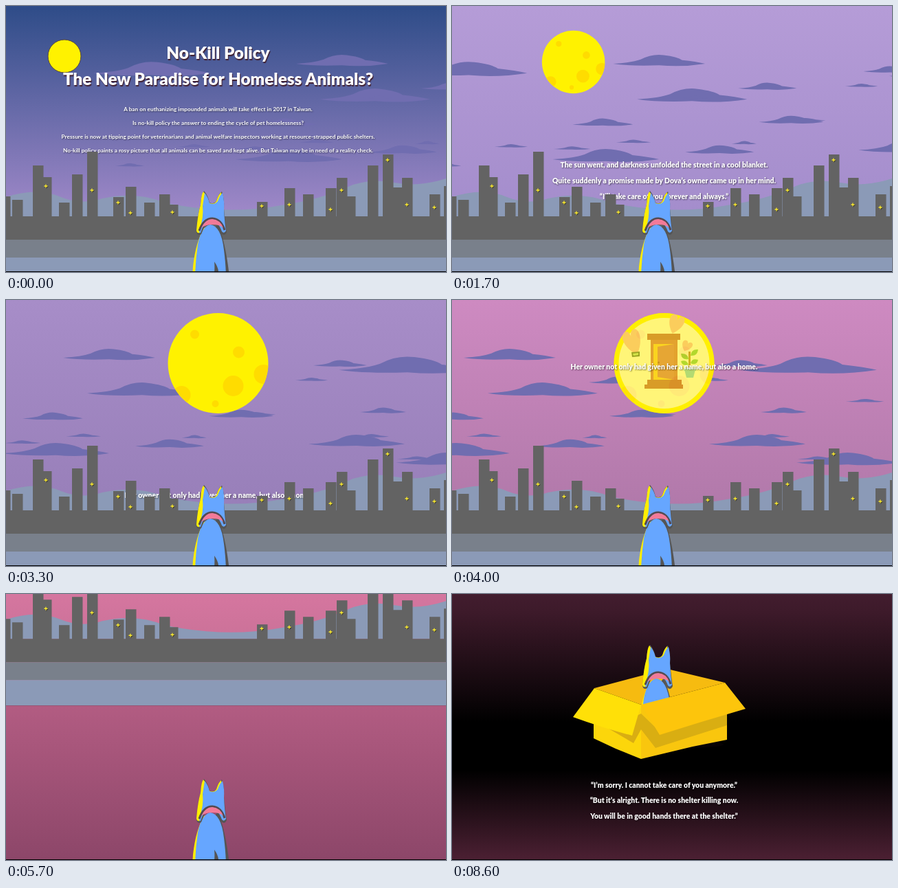
Animation, 640 px wide and 387 px high, one loop 8700 ms. Source, as an HTML page:

```html
<!DOCTYPE html>
<html lang="en">
<head>
<meta charset="utf-8">
<title>No-Kill Policy</title>
<style>
html, body { margin: 0; width: 100%; height: 100%; overflow: hidden; background: #000; }
svg { display: block; width: 100%; height: 100%; }
text { font: 900 10.4px Lato, "Open Sans", sans-serif; fill: #fff; text-anchor: middle; text-shadow: 1px 1px 2px #0008; }
.title { font-size: 24.3px; text-shadow: 1px 2px 1px #402030; }
.intro { font-size: 8.27px; font-weight: 700; }
</style>
</head>
<body>
<svg viewBox="0 0 640 387">
  <defs>
    <linearGradient id="skyFill" gradientUnits="userSpaceOnUse" x1="0" y1="0" x2="0" y2="300">
      <stop id="skyTop"/><stop id="skyLow" offset="1"/>
    </linearGradient>
    <linearGradient id="groundFill" gradientUnits="userSpaceOnUse" x1="0" y1="403" x2="0" y2="1403">
      <stop offset="0" stop-color="#b25c82"/>
      <stop offset=".27" stop-color="#854264"/>
      <stop offset=".64" stop-color="#3d1a2a"/>
      <stop offset=".8" stop-color="#000"/>
      <stop offset=".87" stop-color="#000"/>
      <stop offset="1" stop-color="#4c2033"/>
    </linearGradient>
    <clipPath id="disc"><circle r="73"/></clipPath>
    <path id="cloud" d="M0 .8Q.2 .72 .3 .45Q.42 -.05 .55 .08Q.7 .22 .75 .5Q.9 .62 1 .8Q.75 1.1 .5 .93Q.2 1.02 0 .8Z"/>
    <path id="heart" d="M0 10C-14 -2-10 -13-4 -12Q-1 -12 0 -7Q1 -12 5 -12C11 -12 12 -1 0 10Z"/>
  </defs>

  <g id="page">
    <rect width="640" height="403" fill="url(#skyFill)"/>
    <g id="clouds" fill="#706db0"></g>
    <g id="moon">
      <circle r="73" fill="#fff200"/>
      <circle id="moonEdge" r="73" fill="none" stroke="#54453c" vector-effect="non-scaling-stroke"/>
      <g id="craters" fill="#ffdc00" clip-path="url(#disc)"></g>
      <g id="home">
        <circle r="73" fill="#ffee00"/>
        <circle r="66" fill="#fff9ef"/>
        <g transform="translate(-308.5 -92)">
          <path d="M284 49H332V58H328V116H334V123H336V129H280V123H284V116H289V58H284Z" fill="#b2484f"/>
          <path d="M289 58H328V116H289Z" fill="#c9555d"/>
          <path d="M293 64H323V116H293Z" fill="#f6b73e"/>
          <path d="M299 68L323 64V116L299 112Z" fill="#cf5c68"/>
          <circle cx="300.5" cy="91" r="1.5" fill="#8f353d"/>
          <g fill="#f9a9b8">
            <use href="#heart" transform="translate(264 64) rotate(-18) scale(1.35 1.7)"/>
            <use href="#heart" transform="translate(325 37) rotate(20) scale(1.15 1.25)"/>
            <use href="#heart" transform="translate(341 68) rotate(25) scale(.8 .7)"/>
          </g>
          <path d="M261 76L273 75V82L262 83Z" fill="#3c5b45"/>
          <path d="M263 78L271 77V80L264 81Z" fill="#a9d88f"/>
          <path d="M344 75H347V101H344Z" fill="#a9763f"/>
          <path d="M344 86Q334 88 333 78Q343 77 344 86M347 81Q348 71 358 72Q357 82 347 81M344 94Q335 97 333 89Q341 86 344 94M347 92Q349 84 358 87Q356 96 347 92" fill="#67bf5b"/>
          <path d="M338 101H354L351 113H341Z" fill="#69c4e4"/>
          <path d="M337 99H355V103H337Z" fill="#8fdcf2"/>
        </g>
      </g>
    </g>
    <path d="M0 278Q45 263 80 278Q110 290 140 280Q190 269 230 286Q320 305 400 290Q460 281 500 262Q530 250 565 257T640 251V306H0Z" fill="#8b9ab7"/>
  </g>
  <g id="skyText"></g>
  <g id="city">
    <path id="towers" fill="#636363"/>
    <path d="M0 306H640V340H0Z" fill="#636363"/>
    <path d="M0 340H640V366H0Z" fill="#79808b"/>
    <path d="M0 366H640V403H0Z" fill="#8b9ab7"/>
    <path d="M0 403H640V1500H0Z" fill="url(#groundFill)"/>
    <path id="lightShade" stroke="#33332a" stroke-width="1.5" transform="translate(.8 .8)"/>
    <path id="lights" stroke="#ffee30" stroke-width="1.3"/>
  </g>

  <path id="boxBack" d="M207 137L313 109L397 129L275 161Z" fill="#f6bb10"/>
  <g id="dog">
    <ellipse cx="340" cy="219" rx="55" ry="5" fill="#2a0f20" opacity=".18"/>
    <path d="M308 122Q320 150 325 200Q327 213 318 217Q306 222 292 221L288 150Z" fill="#555"/>
    <path d="M288 128Q276 148 272 184L270 216Q280 222 298 222V126Z" fill="#ffee00"/>
    <path d="M297 123Q284 126 279 152Q274 186 275 217Q294 225 318 216Q322 199 317 160Q313 125 297 123Z" fill="#66a6ff"/>
    <path d="M303 177Q314 192 306 208Q302 214 296 213Q305 200 303 177Z" fill="#555"/>
    <path d="M288 74Q294 81 296 91Q302 94 306 89Q309 78 314 75Q318 86 317 100Q319 122 321 134Q318 141 313 136L308 122H290L284 137Q278 140 277 133Q279 108 283 94Q284 79 288 74Z" fill="#555"/>
    <path d="M287 75Q293 82 295 91Q302 95 306 89Q309 79 313 76L316 100L312 122L288 120L282 135Q277 136 277 131Q279 108 283 94Q284 79 287 75Z" fill="#ffee00"/>
    <path d="M289 77Q294 83 296 92Q303 95 308 89Q311 80 315 77Q318 90 317 101Q318 121 320 132Q317 137 314 133Q307 115 296 117Q288 119 283 135Q281 136 281 132Q288 112 286 96Z" fill="#66a6ff"/>
    <path d="M281 132Q287 114 300 114Q313 115 318 131" fill="none" stroke="#554a50" stroke-width="3"/>
    <path d="M284 128Q290 115 300 115Q312 116 316 128Q312 123 300 123Q290 123 284 128Z" fill="#f27a98"/>
  </g>
  <g id="boxFront">
    <path d="M206 175L275 161V240L238 225L206 210Z" fill="#fcd60b"/>
    <path d="M275 161L400 165V212L350 222L275 240Z" fill="#f9c60e"/>
    <path d="M275 174L302 200L400 172V191L296 224L275 197L264 217L228 196Z" fill="#d9ae12"/>
    <path d="M207 137L275 161L262 206Q220 195 176 179Z" fill="#ffe008"/>
    <path d="M275 161L397 129L427 167Q365 185 302 205Z" fill="#fdc50c"/>
  </g>
  <g id="frontText"></g>
  <path d="M0 386H640V387H0Z"/>
</svg>
<script>
const LOOP = 8700, STEP = 100, SPEED = 0.2675, UNPIN = 4800;
const $ = id => document.getElementById(id);

function add(parent, tag, attrs, text) {
  const el = document.createElementNS("http://www.w3.org/2000/svg", tag);
  for (const key in attrs) el.setAttribute(key, attrs[key]);
  if (text) el.textContent = text;
  $(parent).append(el);
  return el;
}

let seed = 7;
const random = () => (seed = seed * 16807 % 2147483647) / 2147483647;
const between = (a, b) => a + (b - a) * random();

const addCloud = (x, y, w, h = w * 0.13) =>
  add("clouds", "use", { href: "#cloud", transform: `translate(${x} ${y}) scale(${w} ${h})` });

// Large clouds as left, top, width; the small wisps are scattered.
const clouds = [
  [-212, 80, 170], [83, 70, 134], [118, 119, 160], [24, 163, 88], [-5, 207, 155],
  [188, 202, 100], [265, 111, 85], [295, 159, 94], [447, 87, 78], [484, 81, 200],
  [515, 156, 67], [440, 195, 140], [567, 221, 150]
];
clouds.forEach(c => addCloud(...c));
for (let x = -180; x < 780; x += 80) addCloud(x + between(0, 50), between(95, 240), between(35, 60), 5);

for (const [cx, cy, r] of [[-34, -42, 6.5], [30, -16, 8.5], [66, 16, 14], [22, 33, 15], [-53, 46, 13], [-4, 59, 5]])
  add("craters", "circle", { cx, cy, r });

// Tower as left edge, top and, where one is lit, the drop to its light.
const towers = [
  [-9, 277], [9, 282], [39, 232], [51, 249, 13], [77, 286], [96, 245], [118, 212, 56],
  [156, 278, 8], [174, 263, 38], [201, 286], [223, 274], [235, 289, 11],
  [365, 285, 6], [405, 265, 24], [432, 274], [465, 265, 31], [481, 250, 18], [493, 277],
  [526, 232], [548, 216, 8], [562, 264], [576, 250, 39], [616, 274, 19], [637, 262]
];
$("towers").setAttribute("d", towers.map(([x, y]) => `M${x} 307V${y}h15.5V307Z`).join(""));
const crosses = towers.filter(t => t[2])
  .map(([x, y, drop]) => `M${x + 4.5} ${y + drop}h5m-2.5 -2.5v5`).join("");
for (const id of ["lights", "lightShade"]) $(id).setAttribute("d", crosses);

// Each block stands at its given height at time `at` and scrolls with the page.
const blocks = [
  { at: 0, layer: "skyText", kind: "title", y: 77, gap: 38, lines: ["No-Kill Policy", "The New Paradise for Homeless Animals?"] },
  { at: 0, layer: "skyText", kind: "intro", y: 152.5, gap: 20.3, lines: [
    "A ban on euthanizing impounded animals will take effect in 2017 in Taiwan.",
    "Is no-kill policy the answer to ending the cycle of pet homelessness?",
    "Pressure is now at tipping point for veterinarians and animal welfare inspectors working at resource-strapped public shelters.",
    "No-kill policy paints a rosy picture that all animals can be saved and kept alive. But Taiwan may be in need of a reality check."] },
  { at: 1700, layer: "skyText", y: 235, lines: [
    "The sun went, and darkness unfolded the street in a cool blanket.",
    "Quite suddenly a promise made by Dova’s owner came up in her mind.",
    "“I’ll take care of you forever and always.”"] },
  { at: 3300, layer: "skyText", y: 288, lines: ["Her owner not only had given her a name, but also a home."] },
  { at: 4800, layer: "skyText", y: 134, lines: ["Dova once had a happy time."] },
  { at: 7300, layer: "frontText", y: 218, lines: ["But it didn’t last long."] },
  { at: 8600, layer: "frontText", y: 281.5, lines: [
    "“I’m sorry. I cannot take care of you anymore.”",
    "“But it’s alright. There is no shelter killing now.",
    "You will be in good hands there at the shelter.”"] }
];
for (const b of blocks)
  b.nodes = b.lines.map(line => add(b.layer, "text", { x: 308.5, class: b.kind || "story" }, line));

const rgb = hex => [1, 3, 5].map(i => parseInt(hex.slice(i, i + 2), 16));
const skyTops = ["#2e4c88", "#b69dd8", "#a28dc9", "#f987b8"].map(rgb);
const skyLows = ["#9f88c8", "#a58ecd", "#9580bb", "#cc7299"].map(rgb);

const mix = (a, b, p) => a + (b - a) * p;
const progress = (t, from, to) => Math.min(1, Math.max(0, (t - from) / (to - from)));
const shift = (id, x, y) => $(id).setAttribute("transform", `translate(${x} ${y})`);

// The sky passes through its colours at an even pace until the page moves on.
function skyColor(colors, t) {
  const pos = progress(t, 0, UNPIN) * (colors.length - 1);
  const i = Math.min(colors.length - 2, Math.floor(pos));
  return `rgb(${colors[i].map((v, c) => Math.round(mix(v, colors[i + 1][c], pos - i)))})`;
}

function render(t) {
  const lift = -Math.max(0, t - UNPIN) * SPEED;
  shift("page", 0, lift);
  shift("city", 0, lift);
  shift("clouds", 0.0945 * (3300 - t) + 27 * (1 - progress(t, 0, 1700)), 0);
  $("skyTop").setAttribute("stop-color", skyColor(skyTops, t));
  $("skyLow").setAttribute("stop-color", skyColor(skyLows, t));

  const rise = progress(t, 500, 3200);
  const x = mix(85, 308.5, rise ** 1.1), y = mix(73, 92, rise), r = mix(24, 73, rise);
  $("moon").setAttribute("transform", `translate(${x} ${y}) scale(${r / 73})`);
  const detail = progress(t, 600, 1500);
  $("craters").setAttribute("opacity", detail);
  $("moonEdge").setAttribute("opacity", 1 - detail);
  $("home").setAttribute("opacity", progress(t, 3600, 4400));

  for (const b of blocks)
    b.nodes.forEach((n, i) => n.setAttribute("y", b.y + i * (b.gap || 22.8) - (t - b.at) * SPEED));

  shift("dog", 0, mix(195, 0, progress(t, 5800, 7200)));
  const boxY = (8600 - t) * SPEED;
  shift("boxBack", 0, boxY);
  shift("boxFront", 0, boxY);
}

const start = performance.now();
function tick() {
  const t = (performance.now() - start) % LOOP;
  render(Math.floor(t / STEP) * STEP);
  requestAnimationFrame(tick);
}
tick();
</script>
</body>
</html>
```
